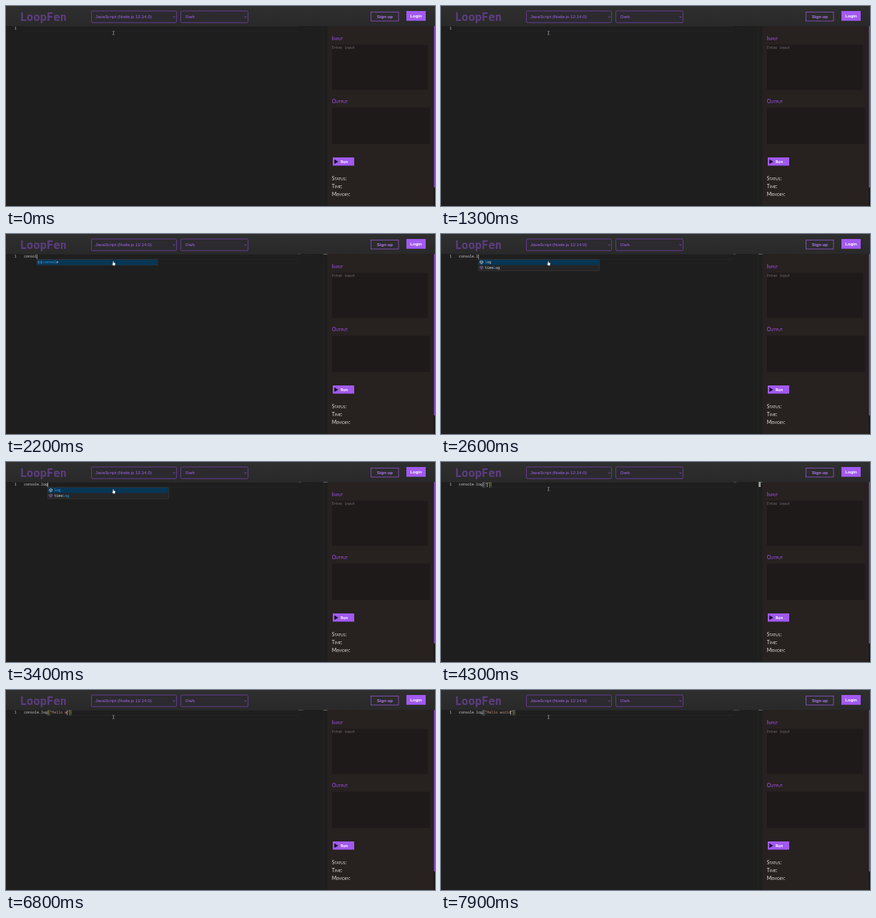
An HTML page for the animation above (8 s loop, 600 px wide and 280 px high).

```html
<!DOCTYPE html>
<html lang="en">
<head>
<meta charset="utf-8">
<title>Code editor</title>
<style>
  html, body { margin: 0; width: 100%; height: 100%; overflow: hidden; background: #1e1e1e; }
  svg { display: block; }
  text { white-space: pre; }
  .ui { font-family: "Liberation Sans", Arial, sans-serif; font-size: 6.26px; fill: #a566f0; }
  .mono { font-family: "Noto Sans Mono", "DejaVu Sans Mono", monospace; font-size: 5.03px; fill: #d4d4d4; }
  .caps { font-family: Lato, sans-serif; font-variant: small-caps; font-size: 6.9px; fill: #e6e2e0; }
  .caps.title { font-size: 7.2px; fill: #a855f7; }
  .logo { font: bold 15.5px "DejaVu Sans Mono", monospace; }
  .field { fill: #2c2a2f; stroke: #7440a8; stroke-width: .8; }
  .line { fill: none; stroke: #a05ae8; stroke-width: .7; }
  .match { fill: #2aaaff; }
  .string { fill: #ce9178; }
  .bracket { fill: #e2c35a; }
</style>
</head>
<body>
<svg width="600" height="280" viewBox="0 0 600 280">
  <defs>
    <linearGradient id="scan" gradientUnits="userSpaceOnUse" x1="0" y1="9" x2="0" y2="11" spreadMethod="repeat">
      <stop offset="0" stop-color="#664091"/>
      <stop offset=".5" stop-color="#664091"/>
      <stop offset="1" stop-color="#402f54"/>
    </linearGradient>
    <linearGradient id="bar" x1="0" y1="0" x2="0" y2="1">
      <stop offset="0" stop-color="#2f2f2f"/>
      <stop offset="1" stop-color="#292929"/>
    </linearGradient>
  </defs>

  <!-- Editor -->
  <rect width="600" height="280" fill="#1e1e1e"/>
  <path d="M22 28.5H409M22 35.3H409" stroke="#292929" stroke-width=".7"/>
  <path d="M444 28V280" stroke="#2a2a2a" stroke-width=".7"/>
  <text class="mono" x="11.8" y="33.2" fill="#c6c6c6">1</text>

  <!-- Header -->
  <rect width="600" height="28" fill="url(#bar)"/>
  <text class="logo" x="19.5" y="20.5" fill="url(#scan)">LoopFen</text>
  <rect class="field" x="119.5" y="7" width="119" height="16.3" rx="1.5"/>
  <rect class="field" x="244.5" y="7" width="94" height="16.3" rx="1.5"/>
  <text class="ui" x="125" y="17.3">JavaScript (Node.js 12.14.0)</text>
  <text class="ui" x="251" y="17.3">Dark</text>
  <path class="line" d="M233.8 14.6l1.5 1.5 1.5-1.5M333.6 14.6l1.5 1.5 1.5-1.5"/>
  <rect class="line" x="510.5" y="8.5" width="38.5" height="12.5"/>
  <text class="ui" x="518.8" y="17.2" style="font-size:6px;font-weight:bold;fill:#b478f5">Sign up</text>
  <rect x="560" y="7" width="27" height="13.7" fill="#a259f0"/>
  <text class="ui" x="565.2" y="16.4" style="font-size:6.1px;font-weight:bold;fill:#fff">Login</text>

  <!-- Side panel -->
  <rect x="449.5" y="28" width="150.5" height="252" fill="#272120"/>
  <rect x="598.6" y="28" width="1.4" height="226" fill="#8b4bd0"/>
  <rect x="598.6" y="254" width="1.4" height="26" fill="#151313"/>
  <text class="caps title" x="455.8" y="47.6">Input</text>
  <rect x="456" y="54.5" width="134" height="63" fill="#1e1a1a"/>
  <text class="mono" x="456" y="59.8" style="font-size:4.85px;fill:#77706e">Enter input</text>
  <text class="caps title" x="455.8" y="135.7">Output</text>
  <rect x="456" y="142.5" width="137" height="50.5" fill="#1e1a1a"/>
  <rect x="457" y="212" width="30" height="11.5" fill="#a259f0"/>
  <path d="M459.3 214.7l5.4 3.2-5.4 3.2z" fill="#120a1a"/>
  <text class="ui" x="468" y="219.8" style="font:bold 5.1px 'Open Sans',sans-serif;fill:#fff">Run</text>
  <text class="caps" x="455.8" y="243.7">Status:</text>
  <text class="caps" x="455.8" y="254.9">Time:</text>
  <text class="caps" x="455.8" y="266">Memory:</text>

  <g id="live"></g>
</svg>
<script>
const LOOP = 8000, LEFT = 25, CHAR = 3.02, ROW = 7.45, POPUP_TOP = 35.8, MAX_ROWS = 12;
const CODE = 'console.log("Hello world';
const KEY_TIMES = [
  1500, 1700, 1900, 2000, 2100, 2200, 2400, 2500, 2600, 2900, 3300, 3800,
  4300, 5500, 5700, 5900, 6100, 6300, 6500, 6800, 7000, 7300, 7500, 7800
];
const GLOBALS = ['confirm', 'console', 'const', 'continue', 'ConstantSourceNode', 'ConvolverNode',
  'CountQueuingStrategy', 'Comment', 'CompositionEvent', 'AbortController', 'AudioContext', 'CSSConditionRule'];
const MEMBERS = ['assert', 'clear', 'count', 'debug', 'dir', 'error', 'group', 'info', 'log', 'table', 'timeLog', 'warn'];
const KEYWORDS = ['const', 'continue'];
const live = document.getElementById('live');

const rect = (x, y, w, h, attrs) => `<rect x="${x}" y="${y}" width="${w}" height="${h}" ${attrs}/>`;
const span = (cls, text) => `<tspan class="${cls}">${text}</tspan>`;
const mono = (x, y, text, style = '') => `<text class="mono" x="${x}" y="${y}" style="${style}">${text}</text>`;
const path = (d, stroke, width = .6, fill = 'none') =>
  `<path d="${d}" stroke="${stroke}" stroke-width="${width}" fill="${fill}"/>`;

function findLetters(name, query) {
  const lower = name.toLowerCase(), start = lower.indexOf(query);
  if (start >= 0) return [...query].map((_, i) => start + i);
  const hits = [];
  let from = 0;
  for (const letter of query) {
    const at = lower.indexOf(letter, from);
    if (at < 0) return null;
    hits.push(at);
    from = at + 1;
  }
  return hits;
}

// Positions of the matched letters; a match has to begin at the start of a word.
function matchLetters(name, query) {
  const hits = findLetters(name, query);
  const startsWord = hits && (!hits[0] || /[A-Z]/.test(name[hits[0]]));
  return startsWord || !query ? hits : null;
}

function icon(kind, x, y, focused) {
  if (kind === 'method') {
    return path(`M${x} ${y - 2.2}l2 1v2.3l-2 1.1-2-1.1v-2.3zm-2 1l2 1.1 2-1.1m-2 1.1v2.3`, focused ? '#fff' : '#b180d7', .5);
  }
  if (kind === 'keyword') {
    return path(`M${x - 2.2} ${y - 1.8}h3m1 0h1M${x - 2.2} ${y}h1.6m1 0h2M${x - 2.2} ${y + 1.8}h4`, '#c5c5c5', .7);
  }
  return path(`M${x - 1.4} ${y - 1.8}h-1v3.6h1M${x + 1.4} ${y - 1.8}h1v3.6h-1`, '#75beff', .6) +
    path(`M${x - 1} ${y}l1-.9 1 .9-1 .9z`, '#75beff', .5);
}

function popup(typed, x) {
  const afterDot = typed.includes('.');
  const query = typed.split('.').pop();
  const items = (afterDot ? MEMBERS : GLOBALS)
    .map(name => ({ name, hits: matchLetters(name, query) }))
    .filter(item => item.hits).slice(0, MAX_ROWS);
  let out = rect(x, POPUP_TOP, 169, items.length * ROW + .5, 'fill="#252526" stroke="#454545" stroke-width=".5"');
  out += rect(x + .3, POPUP_TOP + .2, 168.4, ROW, 'fill="#073655"');
  items.forEach(({ name, hits }, i) => {
    const y = POPUP_TOP + ROW * (i + .5);
    const kind = afterDot || name === 'confirm' ? 'method' : KEYWORDS.includes(name) ? 'keyword' : 'variable';
    const label = [...name].map((c, n) => hits.includes(n) ? span('match', c) : c).join('');
    out += icon(kind, x + 4.4, y, i === 0) + mono(x + 9, y + 1.7, label);
  });
  if (items[0].name === 'confirm') {
    out += mono(x + 56, POPUP_TOP + 5.2, 'function confirm(message?: string): boo…', 'font-size:4.25px;fill:#c3ccd4');
    out += path(`M${x + 161} ${POPUP_TOP + 2.2}l1.5 1.5-1.5 1.5`, '#ddd');
  }
  if (items.length === MAX_ROWS) out += rect(x + 165, POPUP_TOP + .2, 3.7, 18, 'fill="#505050"');
  return out;
}

function codeLine(typed) {
  const closed = typed.length > 11;
  const quoted = typed.length > 12;
  let out = '';
  let text = typed.slice(0, 11);
  if (closed) {
    const end = typed.length + (quoted ? 1 : 0);
    for (const col of [11, end]) {
      out += rect(LEFT + col * CHAR, 28.6, CHAR, 6.5, 'fill="#21301f" stroke="#888" stroke-width=".4"');
    }
    text += span('bracket', '(') + span('string', typed.slice(12) + (quoted ? '"' : '')) + span('bracket', ')');
  }
  return out + mono(LEFT, 33.2, text);
}

const beam = path('M149 35.4h.8l.5.4.5-.4h.8M150.3 35.8v4M149 40.2h.8l.5-.4.5.4h.8', '#bdbdbd', .6);
const hand = path('M149.4 38.3q.7-.7 1.2 0v1.7l2 .5q.5.3.3 1.2l-.5 2.5h-2.6l-1.5-2.3q.2-.9 1.1-.2z', '#222', .3, '#fff');

function render(t) {
  const count = KEY_TIMES.filter(k => t >= k).length;
  const typed = CODE.slice(0, count);
  const lastKey = count ? KEY_TIMES[count - 1] : -600;
  const caret = LEFT + count * CHAR;
  const suggesting = count > 0 && count < 12;
  let out = codeLine(typed);
  if ((t - lastKey) % 1000 < 550) out += rect(caret - .2, 28.7, .7, 6.4, 'fill="#c8c8c8"');
  if (count) {
    out += rect(409, 27.8, count * .33, .8, 'fill="#5a5a5a"');
    out += rect(444, 27.8, 5.5, .8, 'fill="#777"');
  }
  if (count === 12 || count === 13) out += rect(444.3, 28, 2.8, 7, 'fill="#a0a0a0"');
  if (suggesting) out += popup(typed, caret);
  live.innerHTML = out + (suggesting ? hand : beam);
}

function tick() {
  // Small lead so a keystroke is already drawn at its own moment.
  render((performance.now() + 10) % LOOP);
  requestAnimationFrame(tick);
}
tick();
</script>
</body>
</html>
```
